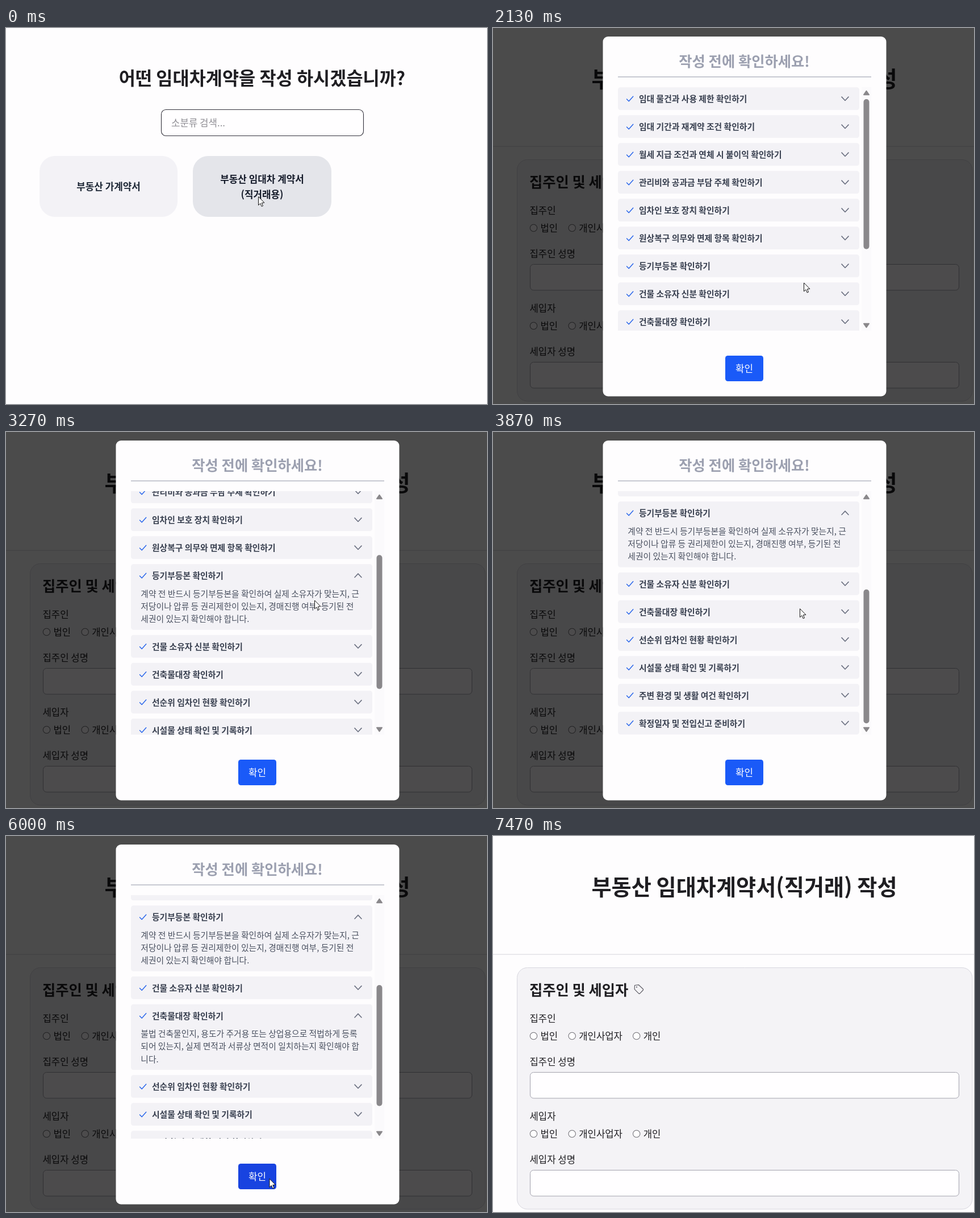
An HTML page with a canvas for the animation above (7540 ms loop, 847 px wide and 661 px high).

```html
<!DOCTYPE html>
<html lang="ko">
<head>
<meta charset="utf-8">
<title>임대차계약서 작성</title>
<style>
  html, body { margin: 0; width: 100%; height: 100%; overflow: hidden; background: #fefdfe; }
  canvas { display: block; width: 847px; height: 661px; }
</style>
</head>
<body>
<canvas id="stage" width="847" height="661"></canvas>
<script>
const ctx = document.getElementById('stage').getContext('2d');
const W = 847, H = 661, LOOP = 7540;
const FONT = '"Noto Sans CJK KR", "Noto Sans CJK", "Noto Sans CJK JP", sans-serif';
const PAPER = '#fefdfe', INK = '#1f1e22', SLATE = '#394050', GRAY = '#6b7080';

// Moments of the hard changes, in ms
const OPEN = 435, EXPAND_A = 2300, EXPAND_B = 4270, CLOSE = 6200;

// [time, x, y] of the pointer tip
const POINTER = [
  [0, 444.5, 296.5], [1250, 444.5, 296.5], [2020, 547.5, 448], [2130, 547.5, 448],
  [2270, 547.5, 418], [2450, 547.5, 418], [3050, 543.5, 296], [3330, 543.5, 296],
  [3800, 540.5, 310], [4100, 540.5, 315], [4900, 540.5, 315], [5600, 464, 602.5], [LOOP, 464, 602.5]
];
const SCROLL = [[0, 0], [2600, 0], [3180, 166], [3350, 166], [3620, 276], [LOOP, 276]];

const ITEMS = [
  '임대 물건과 사용 제한 확인하기', '임대 기간과 재계약 조건 확인하기',
  '월세 지급 조건과 연체 시 불이익 확인하기', '관리비와 공과금 부담 주체 확인하기',
  '임차인 보호 장치 확인하기', '원상복구 의무와 면제 항목 확인하기',
  '등기부등본 확인하기', '건물 소유자 신분 확인하기', '건축물대장 확인하기',
  '선순위 임차인 현황 확인하기', '시설물 상태 확인 및 기록하기',
  '주변 환경 및 생활 여건 확인하기', '확정일자 및 전입신고 준비하기'
];
const DETAILS = {
  6: ['계약 전 반드시 등기부등본을 확인하여 실제 소유자가 맞는지, 근',
      '저당이나 압류 등 권리제한이 있는지, 경매진행 여부, 등기된 전',
      '세권이 있는지 확인해야 합니다.'],
  8: ['불법 건축물인지, 용도가 주거용 또는 상업용으로 적법하게 등록',
      '되어 있는지, 실제 면적과 서류상 면적이 일치하는지 확인해야 합',
      '니다.']
};

// Eased value between the keys around t
function track(keys, t) {
  let i = 1;
  while (i < keys.length - 1 && keys[i][0] < t) i++;
  const a = keys[i - 1], b = keys[i];
  const u = Math.min(1, Math.max(0, (t - a[0]) / (b[0] - a[0])));
  const e = u * u * (3 - 2 * u);
  return a.slice(1).map((v, k) => v + (b[k + 1] - v) * e);
}

// cy is the optical middle of the line
function text(str, x, cy, size, color, weight = 400, align = 'left') {
  ctx.font = `${weight} ${size}px ${FONT}`;
  ctx.textAlign = align;
  ctx.fillStyle = color;
  ctx.fillText(str, x, cy + size * 0.37);
}

function box(x, y, w, h, r, fill, stroke, line = 1) {
  ctx.beginPath();
  ctx.roundRect(x, y, w, h, r);
  if (fill) { ctx.fillStyle = fill; ctx.fill(); }
  if (stroke) { ctx.strokeStyle = stroke; ctx.lineWidth = line; ctx.stroke(); }
}

function path(points, color, width) {
  ctx.beginPath();
  points.forEach(([x, y]) => ctx.lineTo(x, y));
  ctx.strokeStyle = color;
  ctx.lineWidth = width;
  ctx.lineCap = ctx.lineJoin = 'round';
  ctx.stroke();
}

function drawMenu() {
  text('어떤 임대차계약을 작성 하시겠습니까?', 451, 88, 31.7, INK, 700, 'center');
  box(273.5, 143.5, 356, 46, 8, '#fffeff', '#33323c', 1.1);
  text('소분류 검색...', 291, 166.5, 16.8, '#8f8e94');
  box(59, 225, 243, 107, 27, '#f3f2f6');
  box(329, 225, 244, 107, 27, '#e4e5ea');
  text('부동산 가계약서', 180.5, 279, 16.9, '#1f2937', 600, 'center');
  text('부동산 임대차 계약서', 451, 265.5, 16.9, '#161c2b', 600, 'center');
  text('(직거래용)', 451, 292.5, 16.9, '#161c2b', 600, 'center');
}

function drawTag() {
  ctx.beginPath();
  ctx.moveTo(249.5, 262.5);
  ctx.lineTo(256.5, 261.7);
  ctx.lineTo(264.2, 269);
  ctx.quadraticCurveTo(265.2, 270, 264.2, 271);
  ctx.lineTo(258.6, 276.8);
  ctx.quadraticCurveTo(257.6, 277.7, 256.6, 276.8);
  ctx.lineTo(249.2, 269.4);
  ctx.closePath();
  ctx.strokeStyle = '#5f5e66';
  ctx.lineWidth = 1.2;
  ctx.lineJoin = 'round';
  ctx.stroke();
  ctx.beginPath();
  ctx.arc(253, 265.6, 1.1, 0, 7);
  ctx.fillStyle = '#5f5e66';
  ctx.fill();
}

function drawParty(name, dy) {
  text(name, 64.5, 320.5 + dy, 16.7, INK);
  [[71.5, '법인'], [139.2, '개인사업자'], [252.7, '개인']].forEach(([x, label]) => {
    ctx.beginPath();
    ctx.arc(x, 351.5 + dy, 6.2, 0, 7);
    ctx.fillStyle = '#fffeff';
    ctx.fill();
    ctx.strokeStyle = '#75747a';
    ctx.lineWidth = 1.1;
    ctx.stroke();
    text(label, x + 12, 351.5 + dy, 16.7, INK);
  });
  text(name + ' 성명', 64.5, 397 + dy, 16.7, INK);
  box(65.5, 415.5 + dy, 755, 45.5, 6, '#fffeff', '#a3a2ad');
}

function drawForm() {
  text('부동산 임대차계약서(직거래) 작성', 442.5, 90, 38.2, INK, 700, 'center');
  ctx.fillStyle = '#dddce2';
  ctx.fillRect(0, 207.5, W, 1.2);
  box(42.5, 231.5, 801.5, 424.5, 18, '#f4f3f6', '#d8d7df');
  text('집주인 및 세입자', 64, 271, 25.3, INK, 700);
  drawTag();
  drawParty('집주인', 0);
  drawParty('세입자', 172);
}

function drawItem(i, y, open) {
  box(220, y, 425, open ? 115.5 : 40, 4.5, '#f3f2f6');
  path([[235.5, y + 20.8], [239.2, y + 24.5], [246.8, y + 16]], '#2563eb', 1.4);
  text(ITEMS[i], 257, y + 20.3, 14.8, SLATE, 600);
  const tip = open ? -3.2 : 3.2;
  path([[614, y + 20 - tip], [620, y + 20 + tip], [626, y + 20 - tip]], GRAY, 1.6);
  if (open) DETAILS[i].forEach((s, k) => text(s, 237.3, y + 52 + k * 22.2, 14.8, '#4a5160'));
}

function drawArrow(cy, dir) {
  ctx.beginPath();
  ctx.moveTo(657.5, cy - 3.6 * dir);
  ctx.lineTo(662, cy + 3 * dir);
  ctx.lineTo(653, cy + 3 * dir);
  ctx.closePath();
  ctx.fillStyle = ctx.strokeStyle = '#8a888b';
  ctx.lineWidth = 2;
  ctx.lineJoin = 'round';
  ctx.fill();
  ctx.stroke();
}

function drawModal(t, px, py) {
  ctx.fillStyle = 'rgba(0,0,0,0.7)';
  ctx.fillRect(0, 0, W, H);
  box(193.5, 15, 499, 632.5, 9, PAPER);
  text('작성 전에 확인하세요!', 442.5, 59, 25.3, '#9ca0b0', 700, 'center');
  ctx.fillStyle = '#abaebb';
  ctx.fillRect(220, 85.3, 446, 1.3);

  const isOpen = i => (i === 6 && t >= EXPAND_A) || (i === 8 && t >= EXPAND_B);
  const [scroll] = track(SCROLL, t);
  ctx.save();
  ctx.beginPath();
  ctx.rect(220, 104, 446, 428);
  ctx.clip();
  let y = 104.3;
  ITEMS.forEach((_, i) => {
    drawItem(i, y - scroll, isOpen(i));
    y += isOpen(i) ? 124.5 : 49;
  });
  ctx.restore();

  const content = y - 9 - 104.3, rail = 387;
  ctx.fillStyle = '#fbfafc';
  ctx.fillRect(649, 104, 17, 428);
  drawArrow(114.3, 1);
  drawArrow(522.7, -1);
  box(652.5, 125 + scroll / content * rail, 10, 428 / content * rail, 5, '#8a888b');

  const hover = px > 409 && px < 476 && py > 576 && py < 621;
  box(409, 576, 67, 45, 4.5, hover ? '#1843e0' : '#1a5af8');
  text('확인', 442.5, 598.3, 16.9, '#fff', 500, 'center');
}

function drawPointer(x, y) {
  ctx.save();
  ctx.translate(x, y);
  ctx.beginPath();
  [[0, 0], [0, 15], [3.4, 11.9], [5.7, 17.2], [8, 16.2], [5.8, 11], [10.4, 10.6]]
    .forEach(([a, b]) => ctx.lineTo(a, b));
  ctx.closePath();
  ctx.fillStyle = '#fff';
  ctx.fill();
  ctx.strokeStyle = '#111';
  ctx.lineWidth = 1;
  ctx.lineJoin = 'miter';
  ctx.stroke();
  ctx.restore();
}

function draw(t) {
  ctx.fillStyle = PAPER;
  ctx.fillRect(0, 0, W, H);
  const [px, py] = track(POINTER, t);
  if (t < OPEN) drawMenu();
  else drawForm();
  if (t >= OPEN && t < CLOSE) drawModal(t, px, py);
  if (t < CLOSE) drawPointer(px, py);
}

const start = performance.now();
function tick() {
  draw((performance.now() - start) % LOOP);
  requestAnimationFrame(tick);
}
tick();
</script>
</body>
</html>
```
